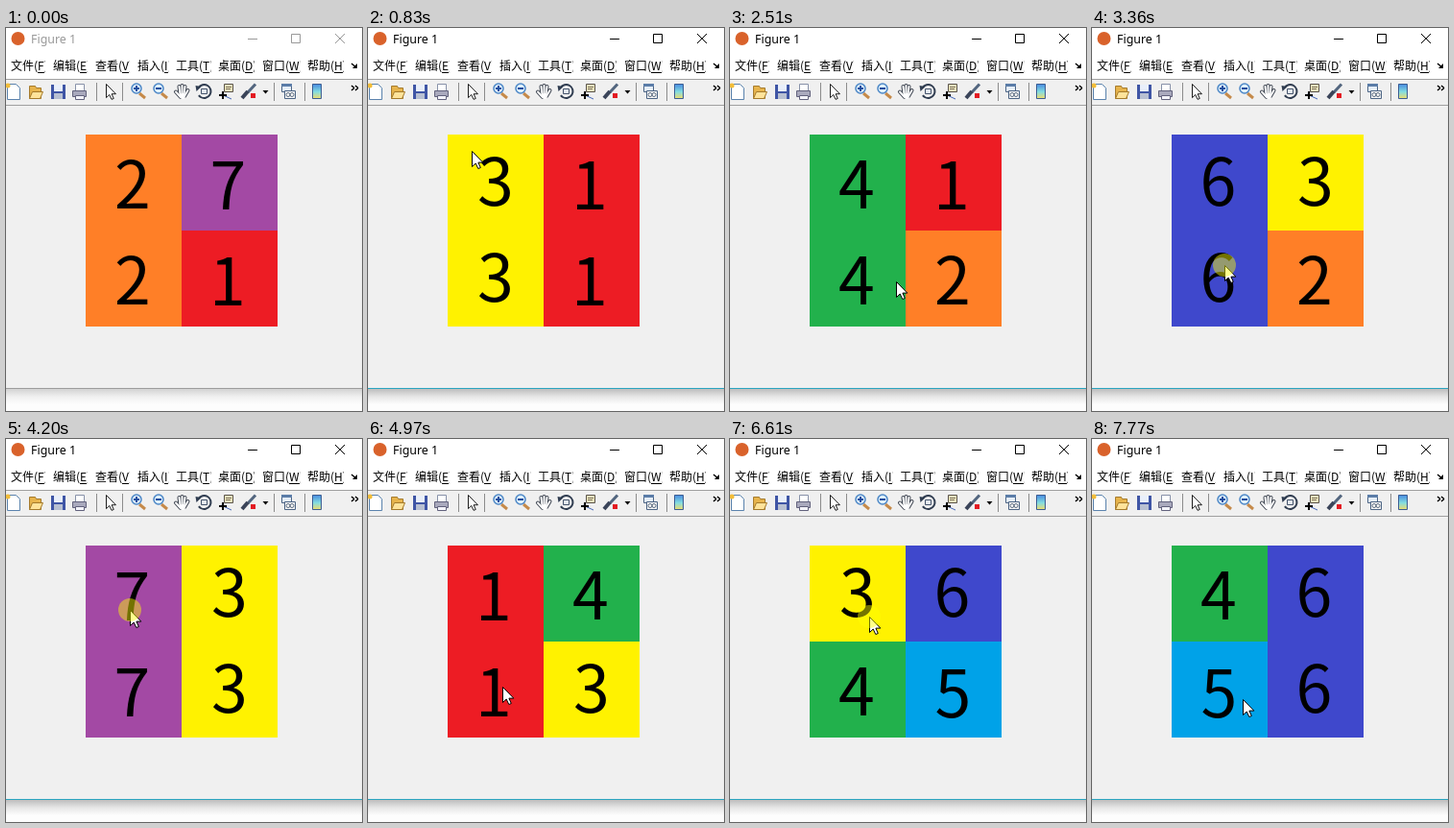
An HTML page with a canvas that plays this animation: 371x399 px, repeating every 8 s.

```html
<!DOCTYPE html>
<html lang="zh">
<head>
<meta charset="utf-8">
<title>Figure 1</title>
<style>
html, body { margin: 0; width: 100%; height: 100%; overflow: hidden; background: #fff; }
canvas { display: block; width: 371px; height: 399px; }
</style>
</head>
<body>
<canvas id="stage" width="371" height="399"></canvas>
<script>
const ctx = document.getElementById('stage').getContext('2d');
const LOOP = 8000;
const ENTER = 130;
const LATENCY = 150;
const HOLD = 200;
const LEFT = 83, TOP = 111, SIZE = 100;
const CJK = '"Noto Sans CJK SC", "Noto Sans CJK", sans-serif';
const COLORS = ['#ed1c24', '#ff7f27', '#fff200', '#22b14c', '#00a2e8', '#3f48cc', '#a349a4'];
const BASELINES = [78, 76.5, 75, 76.5, 79.5, 75, 77.5];
const START = [2, 7, 2, 1];

// Where the pointer arrives and when; some arrivals are mouse presses
const stop = (at, x, y) => ({ at, x, y, press: false });
const press = (at, x, y) => ({ at, x, y, press: true });
const STOPS = [
  stop(ENTER, 262, 385), press(595, 108, 128), stop(1350, 134, 271), stop(1660, 212, 255),
  press(2150, 173, 264), press(2750, 150, 180), press(2960, 150, 180), press(3320, 138, 247),
  stop(3820, 156, 224), stop(4050, 129, 178), press(4195, 129, 178), press(5000, 140, 262),
  stop(5750, 231, 242), press(5830, 231, 242), stop(6210, 145, 185), press(6450, 145, 185),
  press(6950, 152, 258), stop(7300, 168, 270), stop(7770, 157, 271),
];
const PRESSES = STOPS.filter(s => s.press);
const ACTIVATE = PRESSES[0].at + LATENCY;

function rect(x, y, w, h, color) {
  ctx.fillStyle = color;
  ctx.fillRect(x, y, w, h);
}

function outline(fill, stroke, width) {
  if (fill) { ctx.fillStyle = fill; ctx.fill(); }
  if (stroke) { ctx.strokeStyle = stroke; ctx.lineWidth = width; ctx.stroke(); }
}

function box(x, y, w, h, fill, stroke) {
  ctx.beginPath();
  ctx.rect(x + 0.5, y + 0.5, w - 1, h - 1);
  outline(fill, stroke, 1);
}

function disc(x, y, r, fill, stroke, width = 1) {
  ctx.beginPath();
  ctx.arc(x, y, r, 0, Math.PI * 2);
  outline(fill, stroke, width);
}

function line(x1, y1, x2, y2, color, width = 1) {
  ctx.beginPath();
  ctx.moveTo(x1, y1);
  ctx.lineTo(x2, y2);
  outline(null, color, width);
}

function shape(d, x, y, fill, stroke, scale = 1) {
  ctx.save();
  ctx.translate(x, y);
  ctx.scale(scale, scale);
  const path = new Path2D(d);
  ctx.fillStyle = fill;
  ctx.fill(path);
  if (stroke) {
    ctx.strokeStyle = stroke;
    ctx.lineWidth = 1;
    ctx.stroke(path);
  }
  ctx.restore();
}

function text(s, x, y, font, color) {
  ctx.font = font;
  ctx.fillStyle = color;
  ctx.fillText(s, x, y);
}

function arrow(x, y, scale) {
  shape('M0 0V16L3.7 12.5L6.3 18L8.8 17L6.4 11.6H11.3Z', x + 0.5, y + 0.5, '#fff', '#000', scale);
}

function titleBar(active) {
  const ink = active ? '#000' : '#999';
  rect(0, 0, 371, 53, '#fff');
  disc(12.5, 11, 7, '#d9622b');
  text('Figure 1', 26, 16, '12.4px "Noto Sans", sans-serif', ink);
  rect(252, 11, 10, 1, ink);
  box(297, 6, 10, 10, null, ink);
  line(343, 6, 353, 16, ink);
  line(353, 6, 343, 16, ink);
}

function menuBar() {
  let x = 5;
  for (const item of ['文件(F)', '编辑(E)', '查看(V)', '插入(I)', '工具(T)', '桌面(D)', '窗口(W)', '帮助(H)']) {
    ctx.save();
    ctx.font = '12px ' + CJK;
    const width = ctx.measureText(item).width;
    const keyX = ctx.measureText(item.slice(0, 3)).width;
    const keyW = ctx.measureText(item[3]).width;
    ctx.beginPath();
    ctx.rect(x, 28, width - 3, 24);
    ctx.clip();
    text(item, Math.round(x), 44, ctx.font, '#000');
    rect(Math.round(x + keyX), 46, Math.round(keyW), 1, '#000');
    ctx.restore();
    x += width + 4.9;
  }
  line(360, 37, 365, 41, '#000', 1.4);
  shape('M5 0V5H0Z', 361, 37, '#000');
}

function magnifier(x, plus) {
  line(x + 9, 68, x + 15, 73, '#c58a4a', 3);
  disc(x + 6, 63, 5, '#dff1fc', '#4b86c6', 1.5);
  rect(x + 3, 62, 6, 2, '#1d4fa0');
  if (plus) rect(x + 5, 60, 2, 6, '#1d4fa0');
}

function fileIcons() {
  shape('M0 0H9L13 4V16H0Z', 1.5, 58.5, '#fff', '#5b83ad');
  disc(2, 60, 2.5, '#f2bd3a');
  shape('M0 13V0H6L7 2H12V13Z', 24.5, 60.5, '#e7b44c', '#a47a2c');
  shape('M0 7L3 0H14L11 7Z', 24.5, 66.5, '#ffe39a', '#a47a2c');
  rect(47, 59, 15, 15, '#3f55a5');
  rect(50, 59, 9, 7, '#e9effa');
  rect(50, 68, 9, 6, '#b8c0d2');
  box(72, 58, 10, 8, '#fff', '#8791a8');
  box(69, 65, 15, 7, '#a9a9bd', '#62627d');
  box(72, 70, 10, 5, '#f4f4fb', '#62627d');
}

function viewIcons() {
  arrow(104, 58, 0.88);
  magnifier(130, true);
  magnifier(153, false);

  ctx.lineCap = 'round';
  for (const [color, width] of [['#3d4450', 4], ['#fff', 2]]) {
    for (let i = -1; i <= 1; i++) line(183.5 + i * 2, 69, 183.5 + i * 3, 60 + Math.abs(i), color, width);
    line(182, 72, 177, 66.5, color, width);
    line(186, 71, 189.5, 65, color, width);
  }
  ctx.lineCap = 'butt';
  disc(184, 71, 3, '#fff');

  ctx.beginPath();
  ctx.arc(206.5, 66, 7, -2.6, 2.5);
  outline(null, '#2f3c50', 2);
  shape('M0 0L6 1L1 6Z', 197.5, 60, '#2f3c50');
  box(203, 63, 7, 6, '#e4e9ef', '#43526a');

  box(227, 58, 10, 9, '#fff4bf', '#56504a');
  rect(229, 61, 6, 1, '#6d665c');
  rect(229, 63, 5, 1, '#6d665c');
  line(224, 69, 235, 74, '#4567b8');
  rect(222, 69, 8, 2, '#000');
  rect(225, 66, 2, 8, '#000');

  line(260, 58.5, 252, 67, '#52657e', 3);
  line(252, 66, 246, 73, '#3a4459', 4);
  rect(255, 68, 5, 5, '#e31b23');
  shape('M0 0H6L3 3.5Z', 267.5, 65, '#000');
}

function panelIcons() {
  box(287, 58, 11, 9, '#e5eef8', '#4c6484');
  rect(287, 58, 11, 3, '#5b7da8');
  box(290, 65, 12, 9, '#f5f5f5', '#4c6484');
  for (const x of [294, 298]) disc(x, 69.5, 2, null, '#5b6b80');

  const bar = ctx.createLinearGradient(0, 59, 0, 74);
  ['#4b8fe0', '#83dce0', '#f7dc64'].forEach((c, i) => bar.addColorStop(i / 2, c));
  box(319, 58, 10, 16, bar, '#3c5d92');

  for (const x of [360, 364]) {
    line(x, 60, x + 3, 62.5, '#000', 1.4);
    line(x + 3, 62.5, x, 65, '#000', 1.4);
  }
}

function toolbar() {
  rect(0, 53, 371, 28, '#f0f0f0');
  for (const y of [53, 80]) rect(0, y, 371, 1, '#a0a0a0');
  for (const x of [94, 121, 279, 311]) rect(x, 57, 1, 19, '#8c8c8c');
  fileIcons();
  viewIcons();
  panelIcons();
}

function body(active) {
  rect(0, 81, 371, 294, '#f0f0f0');
  const shade = ctx.createLinearGradient(0, 376, 0, 392);
  shade.addColorStop(0, active ? '#bdbdbd' : '#d2d2d2');
  shade.addColorStop(0.5, active ? '#e6e6e6' : '#f0f0f0');
  shade.addColorStop(1, '#fdfdfd');
  rect(0, 376, 371, 23, shade);
  rect(0, 375, 371, 1, active ? '#2aa5c0' : '#9c9c9c');
}

function tile(index, value) {
  const x = LEFT + (index % 2) * SIZE;
  const y = TOP + (index >> 1) * SIZE;
  rect(x, y, SIZE, SIZE, COLORS[value - 1]);
  ctx.font = '500 68px ' + CJK;
  const ink = ctx.measureText(value);
  const tx = x + 48.5 - (ink.actualBoundingBoxRight - ink.actualBoundingBoxLeft) / 2;
  const ty = y + BASELINES[value - 1] - ink.actualBoundingBoxDescent;
  ctx.fillStyle = '#000';
  ctx.fillText(value, tx, ty);
}

function tileUnder({ x, y }) {
  return (x >= LEFT + SIZE ? 1 : 0) + (y >= TOP + SIZE ? 2 : 0);
}

// A press adds one to every tile except the one diagonally opposite
function valueAt(index, t) {
  const hits = PRESSES.filter(p => t >= p.at + LATENCY && 3 - tileUnder(p) !== index).length;
  return (START[index] - 1 + hits) % 7 + 1;
}

// The pointer rests, then leaves just in time: longer ways take longer
function pointerAt(t) {
  const i = STOPS.findIndex(s => s.at > t);
  if (i < 0) return STOPS[STOPS.length - 1];
  const from = STOPS[i - 1], to = STOPS[i];
  const distance = Math.hypot(to.x - from.x, to.y - from.y);
  const free = to.at - from.at - (from.press ? HOLD : 0);
  const travel = Math.min(free, 80 + 1.8 * distance);
  const u = Math.max(0, 1 - (to.at - t) / travel);
  const ease = u * u * (3 - 2 * u);
  return {
    x: Math.round(from.x + (to.x - from.x) * ease),
    y: Math.round(from.y + (to.y - from.y) * ease),
  };
}

function draw(t) {
  const active = t >= ACTIVATE;
  titleBar(active);
  menuBar();
  toolbar();
  body(active);
  START.forEach((_, i) => tile(i, valueAt(i, t)));
  if (t < ENTER) return;
  const { x, y } = pointerAt(t);
  arrow(x, y);
  if (PRESSES.some(p => t >= p.at && t < p.at + HOLD)) disc(x, y, 12, 'rgba(255,255,0,0.45)');
}

const began = performance.now();
function tick() {
  draw((performance.now() - began) % LOOP);
  requestAnimationFrame(tick);
}
tick();
</script>
</body>
</html>
```
